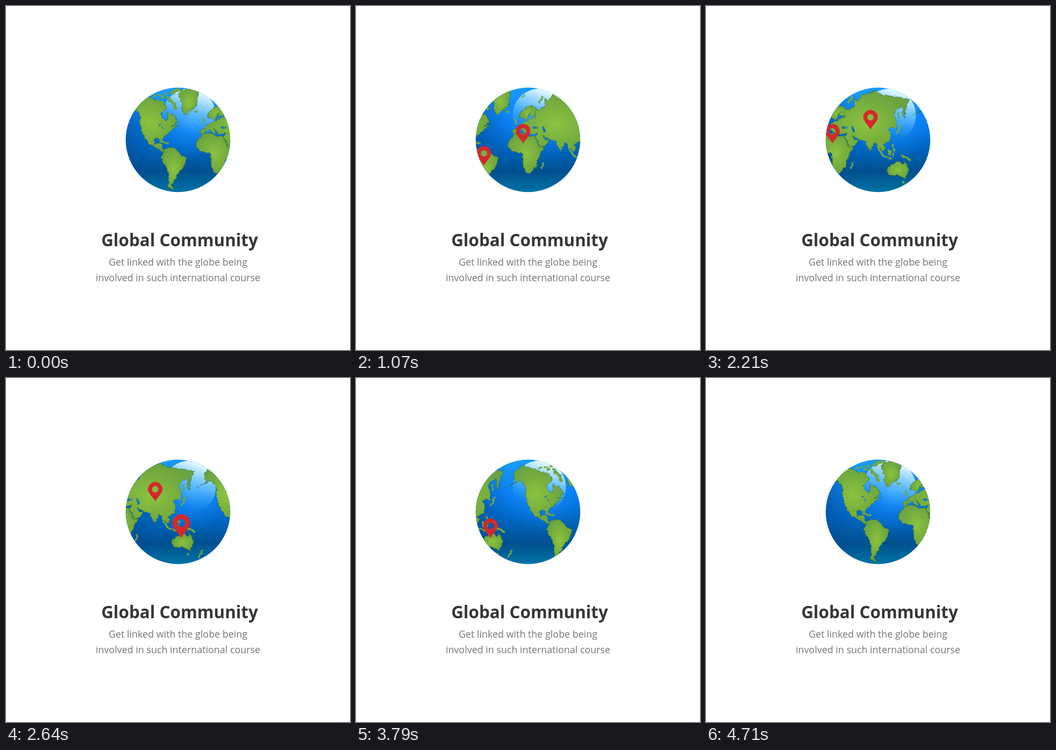
Animation of 640x640 px, one loop 4780 ms. Source, as an HTML page:

```html
<!DOCTYPE html>
<html lang="en">
<head>
<meta charset="utf-8">
<title>Global Community</title>
<style>
  html, body { margin: 0; height: 100%; overflow: hidden; background: #fff; }
  svg { display: block; width: 100%; height: 100%; }
  text { font-family: "Open Sans", sans-serif; text-anchor: middle; }
  .title { font-size: 31.4px; font-weight: 700; fill: #363636; }
  .line { font-size: 17.9px; fill: #757575; }
  #land { fill: url(#grass); stroke: #2c6b35; stroke-width: .7; stroke-linejoin: round; filter: url(#coast); }
  .isles, .lakes { fill: none; stroke: #6fa73f; stroke-width: 3.4; stroke-linecap: round; }
  .lakes { stroke: #0b6cc4; }
  .wide { stroke-width: 6; }
</style>
</head>
<body>
<svg viewBox="0 0 640 640">
  <defs>
    <clipPath id="disc"><circle cx="320" cy="249" r="97.2"/></clipPath>
    <linearGradient id="sea" x2="0" y2="1">
      <stop stop-color="#1ca0f6"/><stop offset=".28" stop-color="#0c84fa"/>
      <stop offset=".55" stop-color="#0068c6"/><stop offset=".8" stop-color="#00508f"/>
      <stop offset="1" stop-color="#0074a6"/>
    </linearGradient>
    <radialGradient id="glow">
      <stop stop-color="#2aa0ff" stop-opacity=".85"/><stop offset="1" stop-color="#0a7cff" stop-opacity="0"/>
    </radialGradient>
    <linearGradient id="shade">
      <stop stop-color="#004a90" stop-opacity=".55"/><stop offset=".3" stop-color="#004a90" stop-opacity="0"/>
    </linearGradient>
    <linearGradient id="gloss" x1=".7" y1=".1" x2=".45" y2=".85">
      <stop stop-color="#e6faff" stop-opacity=".95"/><stop offset=".35" stop-color="#a4e2ff" stop-opacity=".7"/>
      <stop offset="1" stop-color="#4ab4ff" stop-opacity="0"/>
    </linearGradient>
    <radialGradient id="grass">
      <stop stop-color="#8cc440"/><stop offset=".55" stop-color="#79b03e"/><stop offset="1" stop-color="#6ba341"/>
    </radialGradient>
    <!-- Noise roughens the coastlines -->
    <filter id="coast" filterUnits="userSpaceOnUse" x="205" y="145" width="350" height="205" color-interpolation-filters="sRGB">
      <feTurbulence type="fractalNoise" baseFrequency=".2" numOctaves="2" seed="4"/>
      <feDisplacementMap in="SourceGraphic" scale="6" xChannelSelector="R" yChannelSelector="G"/>
    </filter>
    <path id="pin" fill="#d3292d" fill-rule="evenodd"
      d="M0 0C-3-7-13.5-15-13.5-23A13.5 13.5 0 0 1 13.5-23C13.5-15 3-7 0 0ZM-6-23a6 6 0 0 0 12 0a6 6 0 0 0-12 0Z"/>
    <g id="land">
      <!-- North America -->
      <path d="M213 203L231 194 226 179 234 170 243 163 266 169 297 185 298 190 288 200 290 207 298 215 301 208 300 197 308 204 311 199 320 217 307 224 322 221 308 230 300 239 292 245 294 253 281 245 275 248 276 258 287 254 291 261 292 267 298 268 292 272 281 264 266 257 254 237 249 217 250 207 241 190 234 193Z"/>
      <!-- Greenland -->
      <path d="M320 164L326 156 352 153 359 162 354 186 333 204 326 190 328 182Z"/>
      <!-- South America -->
      <path d="M289 281L292 271 304 262 316 265 323 275 336 283 331 299 321 310 308 334 312 342 302 338 302 310 292 290Z"/>
      <!-- Scandinavia -->
      <path d="M375 209L374 202 388 188 398 185 411 193 404 204 394 204 397 195 387 214 383 208Z"/>
      <!-- Eurasia -->
      <path d="M362 236L361 229 371 228 370 224 386 215 405 206 403 196 423 187 423 171 427 178 437 165 463 158 472 165 526 173 520 183 516 208 511 198 513 187 498 195 496 203 501 211 500 229 493 225 487 230 491 240 489 251 477 257 480 264 477 271 471 265 475 280 461 252 452 271 443 253 428 246 418 240 423 249 430 250 427 257 413 263 404 242 409 237 396 238 386 227 391 237 388 238 376 230 367 237Z"/>
      <!-- Africa -->
      <path d="M366 237L382 235 390 242 403 242 412 262 422 261 412 277 405 300 397 311 389 313 382 298 380 274 361 271 353 260 355 251Z"/>
      <!-- Australia -->
      <path d="M484 301L503 289 510 290 513 296 516 288 525 303 518 322 505 315 485 315Z"/>
      <g class="isles">
        <path d="M367 210l2 9M352 197h4M287 251l14 5M412 180l6-12M380 169l4-4"/>
        <path d="M417 300l2-8M508 222l-2 9-5 5M541 321l-8 13M513 328h1M505 200v8"/>
        <path d="M469 268l8 11 14 5M495 274v5M511 279l8 3 8 5M494 259l3 10"/>
        <path class="wide" d="M282 178l10 2M304 175l9 7 2 9M308 162l14-7M488 270v4"/>
        <path stroke-dasharray="4 6" d="M275 168l28-5M290 170h14"/>
      </g>
      <path class="lakes" d="M401 226h8M420 226l1 9"/>
      <path class="lakes" stroke-width="1" style="stroke-width:1.3" d="M284 221l5-1M290 225l3 3"/>
    </g>
  </defs>

  <g clip-path="url(#disc)">
    <path fill="url(#sea)" d="M222 151h196v196h-196Z"/>
    <path fill="url(#shade)" d="M222 151h196v196h-196Z"/>
    <circle cx="345" cy="210" r="78" fill="url(#glow)"/>
    <ellipse cx="341" cy="203" rx="49.5" ry="49" fill="url(#gloss)"/>
    <g id="map">
      <use href="#land"/>
      <use href="#land" x="317"/>
      <g id="pins"></g>
    </g>
  </g>
  <text class="title" x="323" y="447">Global Community</text>
  <text class="line" x="320" y="483">Get linked with the globe being</text>
  <text class="line" x="320" y="512">involved in such international course</text>
</svg>
<script>
  const LOOP = 4780, FRAMES = 67, MAP_WIDTH = 317, POP = 430;
  const map = document.getElementById('map');
  const pinLayer = document.getElementById('pins');

  const pins = [
    { x: 309, y: 297, start: 70 },
    { x: 382, y: 256, start: 600 },
    { x: 452.7, y: 230, start: 1575 },
    { x: 501, y: 298, start: 2400 },
  ].map(pin => {
    const node = document.createElementNS('http://www.w3.org/2000/svg', 'use');
    node.setAttribute('href', '#pin');
    pinLayer.append(node);
    return { ...pin, node };
  });

  // Grow past full size, then settle.
  function popScale(p) {
    if (p <= 0) return 0;
    if (p < .5) return 1.25 * Math.sin(p * Math.PI);
    return Math.max(1, 1.5 - p / 2);
  }

  function draw(now) {
    const step = Math.floor(((now % LOOP) + 4) / LOOP * FRAMES) % FRAMES;
    const time = step / FRAMES * LOOP;
    map.setAttribute('transform', `translate(${-MAP_WIDTH * step / FRAMES})`);
    for (const { x, y, start, node } of pins) {
      const scale = popScale((time - start) / POP);
      node.setAttribute('transform', `translate(${x} ${y}) scale(${scale})`);
    }
  }

  const begin = performance.now();
  function tick() {
    draw(performance.now() - begin);
    requestAnimationFrame(tick);
  }
  tick();
</script>
</body>
</html>
```
